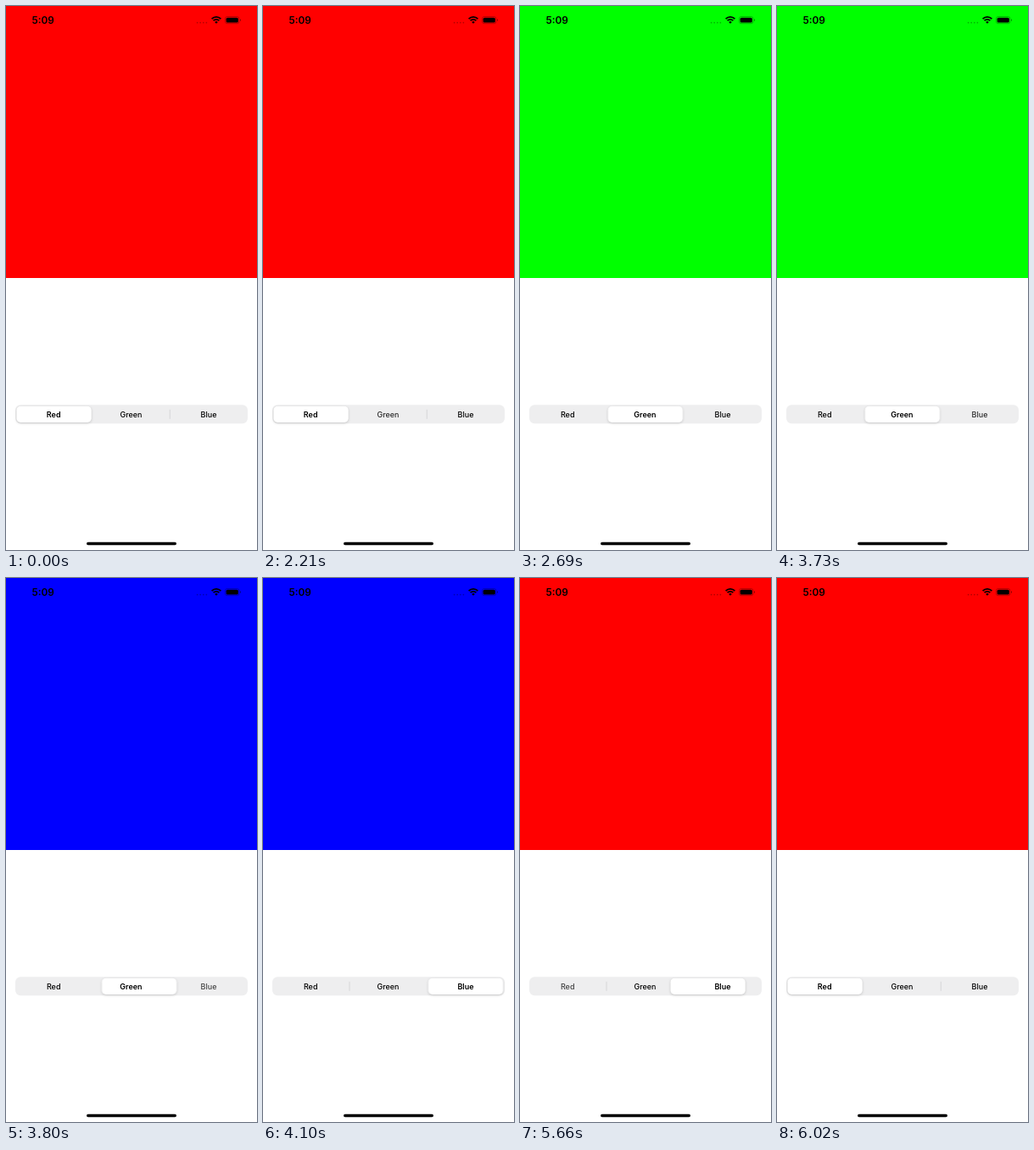
Animation of 296 by 640 pixels, one loop 6060 ms. Source, as an HTML page without scripts:

```html
<!DOCTYPE html>
<html lang="en">
<head>
<meta charset="utf-8">
<title>Colour picker</title>
<style>
html, body { margin: 0; width: 100%; height: 100%; overflow: hidden; background: #fff; }
svg { display: block; width: 296px; height: 640px; }
text { font-family: Inter, Roboto, sans-serif; }
.time { font-size: 11.8px; font-weight: 600; }
.label { font-size: 9px; font-weight: 500; text-anchor: middle; }

.panel, .thumb, .label, .divider { animation: 6060ms step-end infinite; }
.panel { animation-name: panel; }
.thumb { animation-name: thumb; filter: drop-shadow(0 1px 1.5px rgba(0, 0, 0, .16)); }
.red { animation-name: red; }
.green { animation-name: green; }
.blue { animation-name: blue; }
.left { animation-name: left; }
.right { animation-name: right; }

@keyframes panel {
  0% { fill: #f00; }
  37.78% { fill: #0f0; }
  62.7% { fill: #00f; }
  93.39%, 100% { fill: #f00; }
}
@keyframes thumb {
  0% { transform: translateX(0); }
  37.78% { transform: translateX(15.8px); }
  38.94% { transform: translateX(50px); }
  40.09% { transform: translateX(72px); }
  41.41% { transform: translateX(84px); }
  42.57% { transform: translateX(89px); }
  44.38% { transform: translateX(91.2px); }
  62.7% { transform: translateX(100.5px); }
  64.02% { transform: translateX(137px); }
  65.18% { transform: translateX(162px); }
  66.33% { transform: translateX(176px); }
  67.65% { transform: translateX(182.4px); }
  93.39% { transform: translateX(165px); }
  94.55% { transform: translateX(99px); }
  95.87% { transform: translateX(46px); }
  97.02% { transform: translateX(18px); }
  98.18% { transform: translateX(5px); }
  99.33%, 100% { transform: translateX(0); }
}
@keyframes red {
  0% { font-weight: 600; opacity: 1; }
  40.09% { font-weight: 500; opacity: 1; }
  90.75% { font-weight: 500; opacity: .88; }
  92.24% { font-weight: 500; opacity: .72; }
  94.55% { font-weight: 500; opacity: .8; }
  95.87% { font-weight: 600; opacity: .9; }
  97.02%, 100% { font-weight: 600; opacity: 1; }
}
@keyframes green {
  0% { font-weight: 500; opacity: 1; }
  36.46% { font-weight: 500; opacity: .82; }
  37.78% { font-weight: 500; opacity: .7; }
  38.94% { font-weight: 500; opacity: .8; }
  40.09% { font-weight: 600; opacity: .9; }
  41.41% { font-weight: 600; opacity: 1; }
  65.18%, 100% { font-weight: 500; opacity: 1; }
}
@keyframes blue {
  0% { font-weight: 500; opacity: 1; }
  61.55% { font-weight: 500; opacity: .82; }
  62.7% { font-weight: 500; opacity: .72; }
  64.02% { font-weight: 500; opacity: .8; }
  65.18% { font-weight: 600; opacity: .9; }
  66.33% { font-weight: 600; opacity: 1; }
  95.87%, 100% { font-weight: 500; opacity: 1; }
}
@keyframes left {
  0% { opacity: 0; }
  64.02% { opacity: .3; }
  65.18% { opacity: .7; }
  66.33% { opacity: 1; }
  94.55% { opacity: .6; }
  95.87% { opacity: .25; }
  97.02%, 100% { opacity: 0; }
}
@keyframes right {
  0% { opacity: 1; }
  38.94% { opacity: .6; }
  40.09% { opacity: .25; }
  41.41% { opacity: 0; }
  94.55% { opacity: .3; }
  95.87% { opacity: .7; }
  97.02%, 100% { opacity: 1; }
}
</style>
</head>
<body>
<svg viewBox="0 0 296 640">
  <rect width="296" height="640" fill="#fff"/>
  <rect class="panel" width="296" height="320"/>

  <!-- status bar -->
  <text class="time" x="30.6" y="21">5:09</text>
  <path d="M225.6 19.6h12" stroke="#000" stroke-opacity=".3" stroke-width="1.7" stroke-linecap="round" stroke-dasharray="0 3.6"/>
  <g fill="none" stroke="#000" stroke-width="1.7">
    <path d="M242.6 15.1a7.6 7.6 0 0 1 10.8 0"/>
    <path d="M244.6 17.2a4.8 4.8 0 0 1 6.8 0"/>
  </g>
  <path d="M248 20.8l-1.8-1.9a2.5 2.5 0 0 1 3.6 0z"/>
  <rect x="258.4" y="12.5" width="16.6" height="8.2" rx="2.5" fill="none" stroke="#000" stroke-opacity=".38" stroke-width=".7"/>
  <rect x="259.6" y="13.7" width="14.2" height="5.8" rx="1.5"/>
  <path d="M276 15.2q1.1.5 1.1 1.4t-1.1 1.4z" fill-opacity=".45"/>

  <!-- segmented control -->
  <rect x="11" y="469.3" width="274" height="22" rx="6.2" fill="#eeeeef"/>
  <rect class="divider left" x="101.6" y="474.8" width=".8" height="11" fill="#d0d0d3"/>
  <rect class="divider right" x="192.8" y="474.8" width=".8" height="11" fill="#d0d0d3"/>
  <rect class="thumb" x="12.4" y="470.7" width="88.4" height="19.3" rx="4.8" fill="#fff" stroke="#000" stroke-opacity=".05" stroke-width=".5"/>
  <text class="label red" x="56.2" y="483.6">Red</text>
  <text class="label green" x="147.5" y="483.6">Green</text>
  <text class="label blue" x="239" y="483.6">Blue</text>

  <rect x="95" y="630.7" width="106" height="3.6" rx="1.8"/>
</svg>
</body>
</html>
```
